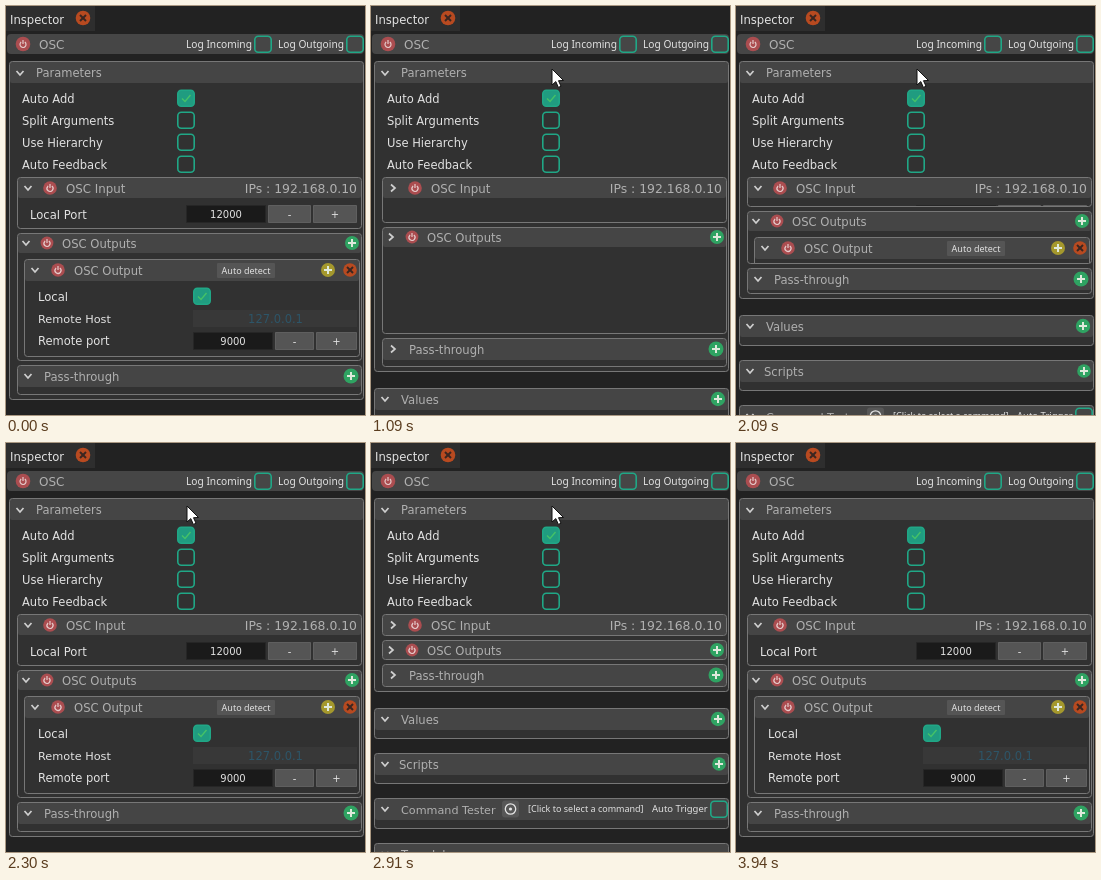
An HTML page with a canvas for the animation above (4320 ms loop, 359x409 px).

```html
<!DOCTYPE html>
<html>
<head>
<meta charset="utf-8">
<style>
html, body { margin: 0; width: 100%; height: 100%; overflow: hidden; background: #222; }
canvas { display: block; }
</style>
</head>
<body>
<canvas id="stage" width="359" height="409"></canvas>
<script>
const LOOP = 4320, STEP = 70;
const ctx = document.getElementById('stage').getContext('2d');
const WIDE = '"DejaVu Sans", sans-serif', NARROW = '"Noto Sans", sans-serif';
const LABEL = '#e2e2e2', TITLE = '#b0b0b0', TEAL = '#20a786', GREEN = '#2fa362';

// [start, first visible step, duration, opening?]
const folds = [
  [1066, 1090, 164, false], [2045, 2090, 201, true],
  [2690, 2700, 201, false], [3349, 3370, 201, true]
];

// Linear at first, then slowing to a stop
function glide(t) {
  if (t >= 1) return 1;
  if (t < 0.5) return t * 4 / 3;
  const u = t - 0.5;
  return 2 / 3 + u * (1 - u) * 4 / 3;
}

const held = (t, start) => start + STEP * Math.floor((t - start) / STEP);

function foldState(t) {
  let state = { p: 1, open: true };
  for (const [start, first, duration, open] of folds) {
    if (t < first) break;
    const done = glide((held(t, first) - start) / duration);
    state = { p: open ? done : 1 - done, open };
  }
  return state;
}

function pointer(t) {
  if (t < 60 || t >= 3940) return null;
  const mix = (a, b, k) => [a[0] + (b[0] - a[0]) * k, a[1] + (b[1] - a[1]) * k];
  const part = (start, duration) => Math.max(0, Math.min(1, (held(t, start) - start) / duration));
  const enter = [286, 396], high = [172, 52], rest = [181, 63], leave = [294, 381];
  if (t < 590) return mix(enter, high, 1 - (1 - part(60, 420)) ** 2);
  if (t < 3580) return mix(high, rest, part(590, 210));
  const k = t >= 3870 ? 1 : part(3580, 290);
  return mix(rest, leave, k * k * (3 - 2 * k));
}

function text(s, x, y, color = LABEL, size = 11.6, align = 'left', family = WIDE) {
  ctx.font = size + 'px ' + family;
  ctx.textAlign = align;
  ctx.textBaseline = 'alphabetic';
  ctx.fillStyle = color;
  ctx.fillText(s, x, Math.round(y + size * 0.36));
}

function box(x, y, r, b, fill, stroke, radius = 0, width = 1) {
  ctx.beginPath();
  const inset = stroke ? width / 2 : 0;
  ctx.roundRect(x + inset, y + inset, r - x - 2 * inset, b - y - 2 * inset, radius);
  if (fill) { ctx.fillStyle = fill; ctx.fill(); }
  if (stroke) { ctx.strokeStyle = stroke; ctx.lineWidth = width; ctx.stroke(); }
}

function line(points, color, width) {
  ctx.beginPath();
  points.forEach(([x, y]) => ctx.lineTo(x, y));
  ctx.strokeStyle = color;
  ctx.lineWidth = width;
  ctx.stroke();
}

function disc(x, y, r, color) {
  ctx.beginPath();
  ctx.arc(x, y, r, 0, 7);
  ctx.fillStyle = color;
  ctx.fill();
}

function power(x, y, r = 6.8) {
  disc(x, y, r, '#ab4d50');
  ctx.beginPath();
  ctx.arc(x, y + 0.4, 3, -0.9, Math.PI + 0.9);
  ctx.strokeStyle = '#e6cccc';
  ctx.lineWidth = 1.2;
  ctx.stroke();
  line([[x, y - 4], [x, y]], '#e6cccc', 1.2);
}

function plus(x, y, color = GREEN, r = 7) {
  disc(x, y, r, color);
  line([[x - 4, y], [x + 4, y]], '#dfe9dc', 2);
  line([[x, y - 4], [x, y + 4]], '#dfe9dc', 2);
}

function cross(x, y, r) {
  disc(x, y, r, '#b84a20');
  line([[x - 3, y - 3], [x + 3, y + 3]], '#3a2620', 2);
  line([[x + 3, y - 3], [x - 3, y + 3]], '#3a2620', 2);
}

function check(x, y, on) {
  box(x, y, x + 18, y + 17.5, on && '#209c80', TEAL, 3.5, 1.6);
  if (on) line([[x + 5, y + 9], [x + 8, y + 12], [x + 13.5, y + 5.5]], '#45c267', 1.4);
}

function arrow(x, y, open) {
  line(open ? [[x - 3.5, y - 2], [x, y + 2], [x + 3.5, y - 2]]
            : [[x - 2, y - 3.5], [x + 2, y], [x - 2, y + 3.5]], '#cfcfcf', 1.7);
}

function panel(x, y, r, b, headHeight = 21) {
  box(x, y, r, b, '#313131', null, 3);
  box(x + 1, y + 1, r - 1, Math.min(b - 1, y + headHeight), '#454545', null, 2);
  box(x, y, r, b, null, '#777', 3);
}

function clipped(x, y, r, b, draw) {
  ctx.save();
  ctx.beginPath();
  ctx.rect(x, y, r - x, b - y);
  ctx.clip();
  draw();
  ctx.restore();
}

function numberRow(value, y, x, r, split) {
  box(x, y - 9, r, y + 9, '#1a1a1a', '#262626');
  text(value, (x + r) / 2, y, LABEL, 10, 'center');
  [[r + 2, split - 1, '-'], [split + 1, 351, '+']].forEach(([a, b, sign]) => {
    box(a, y - 9, b, y + 9, '#555', '#5f5f5f');
    text(sign, (a + b) / 2, y, LABEL, 10, 'center');
  });
}

function header() {
  box(0, 0, 359, 409, '#222');
  box(0, 0, 89, 25, '#2e2e2e');
  text('Inspector', 4, 14);
  cross(77, 12, 7.3);
  box(1, 28, 358, 48, '#464646', null, 4);
  power(17, 38, 7.3);
  text('OSC', 33, 39, TITLE, 12);
  text('Log Incoming', 180, 38, LABEL, 10.2, 'left', NARROW);
  text('Log Outgoing', 272, 38, LABEL, 10.2, 'left', NARROW);
  check(248, 29.5);
  check(340, 29.5);
}

function inputPanel(bottom, open) {
  panel(11, 171, 356, bottom);
  arrow(22, 182, open);
  power(44, 182);
  text('OSC Input', 60, 183, TITLE, 11.8);
  text('IPs : 192.168.0.10', 351, 183, TITLE, 12.4, 'right');
  if (open) clipped(12, 172, 355, bottom - 1, () => {
    text('Local Port', 24, 209);
    numberRow('12000', 208, 180, 260, 306);
  });
}

function outputsPanel(top, bottom, open) {
  panel(11, top, 356, bottom, 20);
  arrow(20, top + 10, open);
  power(41, top + 10, 6.4);
  text('OSC Outputs', 56, top + 11, TITLE);
  plus(346, top + 10);
  if (open) clipped(12, top + 1, 355, bottom - 1, () => {
    ctx.translate(0, top - 227);
    panel(18, 253, 354, 351, 22);
    arrow(29, 264, true);
    power(52, 264);
    text('OSC Output', 68, 265, TITLE);
    box(211, 257, 269, 272, '#555', null, 1);
    text('Auto detect', 240, 265, LABEL, 9, 'center', NARROW);
    plus(322, 264, '#a4982d');
    cross(344, 264, 6.8);
    text('Local', 32, 291);
    check(187, 281.5, true);
    text('Remote Host', 32, 313, LABEL, 11.3);
    box(187, 304, 351, 321, '#383838');
    text('127.0.0.1', 269.5, 313, '#2d5568', 11.5, 'center');
    text('Remote port', 32, 335, LABEL, 11.5);
    numberRow('9000', 335, 187, 267, 309);
  });
}

function section(y, title, x = 30, size) {
  panel(3, y, 358, y + 31, 22);
  arrow(14, y + 11, true);
  text(title, x, y + 12, TITLE, size);
}

// Draws the folding block and returns where the next section begins
function parameters({ p, open }) {
  const inputGrow = Math.floor(30 * p);
  const passGrow = inputGrow + Math.ceil(108 * p);
  const endGrow = passGrow + Math.ceil(7 * p);
  const end = 249 + endGrow;
  panel(3, 55, 358, end, 22);
  arrow(14, 67, true);
  text('Parameters', 30, 67, TITLE, 11.5);
  ['Auto Add', 'Split Arguments', 'Use Hierarchy', 'Auto Feedback'].forEach((name, i) => {
    text(name, 16, 93 + 22 * i, LABEL, 11.5);
    check(171, 83.5 + 22 * i, i === 0);
  });
  inputPanel(193 + inputGrow, open);
  outputsPanel(197 + inputGrow, 217 + passGrow, open);
  const pass = 221 + passGrow;
  panel(11, pass, 356, 244 + endGrow, 22);
  arrow(22, pass + 11, open);
  text('Pass-through', 38, pass + 12, TITLE);
  plus(345, pass + 11, GREEN, 7.5);
  return end + 16;
}

function sections(y) {
  section(y, 'Values');
  plus(347, y + 11, GREEN, 7.2);
  section(y + 45, 'Scripts', 28);
  plus(348, y + 56, GREEN, 6.8);
  const row = y + 101;
  section(y + 90, 'Command Tester', 30, 11.2);
  box(131, row - 8.5, 148, row + 8.5, '#575757', null, 3);
  ctx.beginPath();
  ctx.arc(139.5, row, 5.2, 0, 7);
  ctx.strokeStyle = '#e4e4e4';
  ctx.lineWidth = 1.3;
  ctx.stroke();
  disc(139.5, row, 1.6, '#e4e4e4');
  text('[Click to select a command]', 157, row, LABEL, 9, 'left', NARROW);
  text('Auto Trigger', 281, row, LABEL, 9.5, 'left', NARROW);
  check(339, row - 8.5);
  section(y + 135, 'Templates');
}

function drawPointer([x, y]) {
  const shape = [[0, 0], [0, 16], [3.8, 12.6], [6.4, 18.4], [9, 17.2], [6.5, 11.7], [11.5, 11.5]];
  ctx.beginPath();
  shape.forEach(([dx, dy]) => ctx.lineTo(x + dx, y + dy));
  ctx.closePath();
  ctx.fillStyle = '#fff';
  ctx.fill();
  ctx.strokeStyle = '#111';
  ctx.lineWidth = 1;
  ctx.stroke();
}

function frame() {
  const t = performance.now() % LOOP;
  header();
  sections(parameters(foldState(t)));
  const spot = pointer(t);
  if (spot) drawPointer(spot);
  requestAnimationFrame(frame);
}
frame();
</script>
</body>
</html>
```
